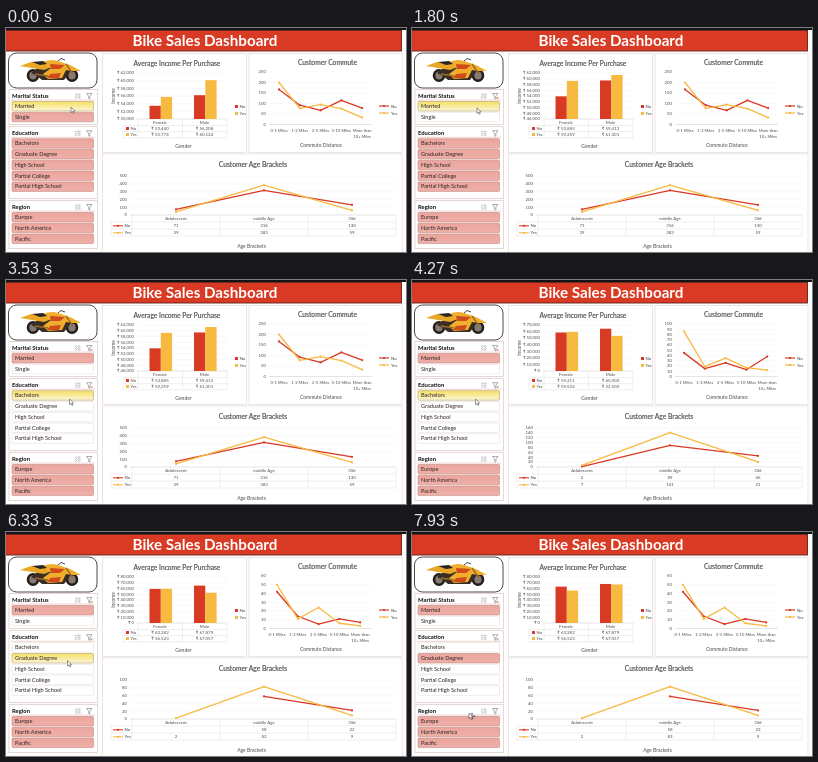
Recreate the animation shown at these times as an HTML page. Size 400 by 224 pixels, loop 8 s.

```html
<!DOCTYPE html>
<html lang="en">
<head>
<meta charset="utf-8">
<title>Bike Sales Dashboard</title>
<style>
html, body { margin: 0; width: 100%; height: 100%; overflow: hidden; background: #fff; }
svg { display: block; width: 100vw; height: 100vh; font-family: Lato, 'Noto Sans', sans-serif; }
</style>
</head>
<body>
<svg id="stage" viewBox="0 0 400 224">
  <defs>
    <linearGradient id="glow" x2="0" y2="1">
      <stop offset="0" stop-color="#f6df62"/><stop offset="1" stop-color="#fbf5d6"/>
    </linearGradient>
    <linearGradient id="pink" x2="0" y2="1">
      <stop offset="0" stop-color="#eba59d"/><stop offset="1" stop-color="#eeb0a9"/>
    </linearGradient>
  </defs>
  <g id="base"></g>
  <g id="live"></g>
  <g id="cursor"></g>
</svg>
<script>
const LOOP = 8000;
const RED = '#d93a24', GOLD = '#f7ba41', INK = '#4c4c4c', GRID = '#e2dcdc';
const el = id => document.getElementById(id);

// Drawing helpers
const text = (s, x, y, size = 4.5, anchor = 'middle', fill = INK, extra = '') =>
  `<text x="${x}" y="${y}" font-size="${size}" text-anchor="${anchor}" fill="${fill}" ${extra}>${s}</text>`;
const bold = (s, x, y, size, anchor, fill) => text(s, x, y, size, anchor, fill, 'font-weight="700"');
const heading = (s, x, y) => text(s, x, y, 6.7, 'middle', INK, `stroke="${INK}" stroke-width=".15"`);
const rect = (x, y, w, h, fill, extra = '') =>
  `<rect x="${x}" y="${y}" width="${w}" height="${h}" fill="${fill}" ${extra}/>`;
const dot = (x, y, fill) => `<circle cx="${x}" cy="${y}" r="1.1" fill="${fill}"/>`;
const path = (d, stroke, width = .5, extra = '') =>
  `<path d="${d}" fill="none" stroke="${stroke}" stroke-width="${width}" ${extra}/>`;
const hline = (x1, x2, y, color = GRID, width = .5) => path(`M${x1} ${y}H${x2}`, color, width);
const rupee = v => '₹ ' + Math.round(v).toLocaleString('en-US');
const smooth = k => { k = Math.max(0, Math.min(1, k)); return k * k * (3 - 2 * k); };

// Values are listed as No, then Yes
const incomes = [
  { max: 62000, min: 50000, step: 2000, no: [53440, 56208], yes: [55774, 60124] },
  { max: 62000, min: 46000, step: 2000, no: [53885, 59412], yes: [59259, 61301] },
  { max: 70000, min: 0, step: 10000, no: [59211, 65000], yes: [59524, 52500] },
  { max: 80000, min: 0, step: 10000, no: [63282, 67879], yes: [56523, 67057] }
];
const commutes = [
  { max: 250, step: 50, no: [167, 92, 67, 115, 78], yes: [200, 77, 95, 76, 33] },
  { max: 100, step: 10, no: [45, 15, 26, 13, 38], yes: [86, 19, 35, 17, 12] },
  { max: 60, step: 10, no: [42, 14, 5, 11, 7], yes: [50, 11, 24, 6, 3] }
];
const ages = [
  { max: 500, step: 100, no: [71, 316, 130], yes: [39, 383, 59] },
  { max: 160, step: 20, no: [2, 89, 46], yes: [7, 141, 21] },
  { max: 100, step: 20, no: [null, 58, 22], yes: [2, 83, 9] }
];

const slicers = [
  { name: 'Marital Status', y: 61.5, h: 35, items: ['Married', 'Single'], picks: [[300, 0]] },
  { name: 'Education', y: 98.7, h: 72, picks: [[3100, 0], [5900, 1]],
    items: ['Bachelors', 'Graduate Degree', 'High School', 'Partial College', 'Partial High School'] },
  { name: 'Region', y: 172.5, h: 48, items: ['Europe', 'North America', 'Pacific'], picks: [] }
];
const incomeTimes = [0, 400, 3800, 6300];
const lineTimes = [0, 3800, 6150];

// Cursor legs: start, end, x, y
const legs = [
  [0, 0, 65, 79], [1750, 2350, 63.5, 119], [4500, 5000, 64, 120.2],
  [5450, 5800, 61.5, 128.5], [7000, 7600, 57, 181]
];

const stepAt = (times, t) => times.filter(s => s <= t).length - 1;

function cursorAt(t) {
  let [, , x, y] = legs[0];
  for (const [a, b, tx, ty] of legs.slice(1)) {
    const k = smooth((t - a) / (b - a));
    x += (tx - x) * k;
    y += (ty - y) * k;
  }
  return [x, y];
}

function bike() {
  const wheel = x => `<ellipse cx="${x}" cy="47.5" rx="5" ry="5.2" fill="#857b72" stroke="#221d1a" stroke-width="2.6"/>`;
  const shape = (d, fill) => `<path d="${d}" fill="${fill}"/>`;
  return wheel(27) + wheel(66) +
    shape('M25 45L34 38L58 37L64 44L58 52L36 52L31 48Z', '#3a2d25') +
    shape('M14 38L25 34L36 34L46 39L38 42L26 40Z', '#e9a827') +
    shape('M35 35Q44 30 52 33L64 37L75 43L66 43L60 42L56 50L42 51L37 46L45 40Z', '#efae2c') +
    shape('M44 36L59 37L54 41L45 41ZM44 46L55 45L53 50L41 50Z', '#cf4a1d') +
    shape('M26 34L37 33L41 36L34 37Z', '#2a2422') +
    path('M60 36L67 46M29 46L42 48', '#9b6a25', 1.4) +
    path('M52 33L55 30.5L59 32', '#333', .9);
}

function drawBase() {
  const panel = (x, y, w, h) => rect(x, y, w, h, '#fff', `stroke="${GRID}" stroke-width=".7"`);
  let s = rect(0, 0, 400, 224, '#fffcfc') + rect(0, 0, 400, 2, '#151313') +
    rect(-1, 2.5, 396.5, 20.5, RED, 'stroke="#5e211a" stroke-width=".9"') +
    bold('Bike Sales Dashboard', 199, 18, 15.2, 'middle', '#fff') +
    rect(2.5, 25, 88.5, 35, '#fff', 'rx="8" stroke="#3d3535" stroke-width=".9"') + bike();
  s += panel(96.5, 25.5, 144, 99) + panel(243, 25.5, 153, 99) + panel(96.5, 126, 299.5, 101);
  s += heading('Average Income Per Purchase', 171, 37.9) + heading('Customer Commute', 321.5, 36.8) +
    heading('Customer Age Brackets', 247, 139.3);
  s += text('Gender', 177.5, 120, 5) + text('Commute Distance', 315, 118.7, 5) + text('Age Brackets', 245.5, 219.8, 5) +
    text('Income', 0, 0, 4.8, 'middle', INK, 'transform="translate(109 68) rotate(-90)"');
  [['No', RED], ['Yes', GOLD]].forEach(([name, color], i) => {
    const y = 78.5 + i * 7;
    s += rect(229, y - 1.5, 3, 3, color) + text(name, 233.5, y + 1.5, 4.4, 'start');
    s += hline(373, 383, y - .5, color, 1.2) + dot(378, y - .5, color) + text(name, 385, y + 1, 4.4, 'start');
    s += rect(120, 99 + i * 6, 3, 3, color) + text(name, 124.5, 102.1 + i * 6, 4.2, 'start');
    s += hline(107, 117, 197.8 + i * 7, color, 1.1) + dot(112, 197.8 + i * 7, color) +
      text(name, 118.5, 199.4 + i * 7, 4.4, 'start');
  });
  // Data table rules
  s += path('M132 91V109.8M176.5 91V109.8M221 91V109.8M117 97.5V109.8M117 97.5H221M117 103.7H221M117 109.8H221', GRID);
  s += path('M126 187V208M214 187V208M302 187V208M390 187V208M105 194V208M105 194H390M105 201H390M105 208H390', GRID);
  s += text('Female', 154, 95.8, 4.4) + text('Male', 198.5, 95.8, 4.4);
  ['Adolescent', 'middle Age', 'Old'].forEach((n, i) => s += text(n, 170 + i * 88, 192, 4.4));
  el('base').innerHTML = s;
}

function axis({ max, min = 0, step }, top, bottom, right, x2, label) {
  let s = '';
  for (let v = min; v <= max; v += step) {
    const y = bottom - (v - min) / (max - min) * (bottom - top);
    s += hline(right + 3, x2, y, v === min ? '#cfc8c8' : '#f5f1f1') + text(label(v), right, y + 1.3, 4.3, 'end');
  }
  return s;
}

function incomeChart(t) {
  const n = stepAt(incomeTimes, t), now = incomes[n], was = incomes[Math.max(0, n - 1)];
  const k = smooth((t - incomeTimes[n]) / 600);
  let s = axis(now, 45, 91, 128, 221, rupee);
  ['no', 'yes'].forEach((key, j) => now[key].forEach((v, i) => {
    const shown = Math.max(now.min, was[key][i] + (v - was[key][i]) * k);
    const h = (shown - now.min) / (now.max - now.min) * 46;
    s += rect(143.5 + i * 44.5 + j * 11.3, 91 - h, 11.3, h, j ? GOLD : RED) +
      text(rupee(v), 154 + i * 44.5, 102.1 + j * 6, 4.4);
  }));
  return s;
}

function plot(data, x0, dx, bottom, height) {
  const line = (vals, color) => {
    const pts = vals.map((v, i) => [x0 + i * dx, bottom - v / data.max * height]).filter((p, i) => vals[i] !== null);
    return path('M' + pts.map(p => p.join(' ')).join('L'), color, 1.3, 'stroke-linejoin="round" stroke-linecap="round"') +
      pts.map(([x, y]) => dot(x, y, color)).join('');
  };
  return line(data.no, RED) + line(data.yes, GOLD);
}

function lineCharts(t) {
  const n = stepAt(lineTimes, t), ride = commutes[n], age = ages[n];
  const x0 = 273 - n, bottom = 96.5, same = v => v;
  let s = axis(ride, 44, bottom, 260, 366, same) + plot(ride, x0, 20.8, bottom, bottom - 44);
  ['0-1 Miles', '1-2 Miles', '2-5 Miles', '5-10 Miles', 'More than'].forEach((name, i) =>
    s += text(name, x0 + i * 20.8, 104.4, 4.1));
  s += text('10+ Miles', x0 + 83.2, 109.9, 4.1);
  s += axis(age, 148, 187, 121, 390, same) + plot(age, 170, 88, 187, 39);
  ['no', 'yes'].forEach((key, j) => age[key].forEach((v, i) =>
    s += text(v ?? '', 170 + i * 88, 199.4 + j * 7, 4.4)));
  return s;
}

function slicer({ name, y, h, items, picks }, t, [cx, cy]) {
  const pick = picks.filter(p => p[0] <= t).pop();
  let s = rect(3, y, 88.5, h, '#fff', 'stroke="#d9c8c6" stroke-width=".7"') +
    bold(name, 6, y + 8.1, 5.9, 'start', '#111') + hline(5, 89, y + 10.6, '#dfa39c');
  for (let i = 0; i < 3; i++) s += path(`M69 ${y + 4.5 + i * 1.9}l.7 .6l1 -1.2M71.5 ${y + 4.6 + i * 1.9}h3`, '#777');
  s += path(`M80.5 ${y + 4}h5.5l-2.1 2.6v3l-1.3 -.8v-2.2z`, '#777', .6);
  if (pick) s += path(`M84.6 ${y + 7.5}l2 2m0 -2l-2 2`, '#b9665c', .6);
  items.forEach((label, i) => {
    const top = y + 12 + i * 10.8;
    const hover = cx > 6 && cx < 88 && cy >= top && cy < top + 10.2;
    const on = !pick || pick[1] === i;
    const [fill, edge] = hover ? ['url(#glow)', '#b5a571'] : on ? ['url(#pink)', '#c58a83'] : ['#fff', '#e8dedd'];
    s += rect(6, top, 81.5, 9.5, fill, `rx="1" stroke="${edge}" stroke-width=".6"`) +
      text(label, 9, top + 6.5, 5.6, 'start', '#2a2222');
  });
  return s;
}

function drawCursor([x, y]) {
  const move = y > 173 ? path('M0 3.2H6M3 .2V6.2M1 2.2L0 3.2L1 4.2M5 2.2L6 3.2L5 4.2M2 1.2L3 .2L4 1.2M2 5.2L3 6.2L4 5.2', '#333', .6) : '';
  return `<g transform="translate(${x} ${y})">${move}` +
    '<path d="M0 0V5.6L1.4 4.4L2.4 6.5L3.3 6.1L2.4 4.1H4.1Z" fill="#fff" stroke="#333" stroke-width=".5"/></g>';
}

let last = '';
function draw(t) {
  const at = cursorAt(t);
  const s = slicers.map(g => slicer(g, t, at)).join('') + incomeChart(t) + lineCharts(t);
  if (s !== last) el('live').innerHTML = last = s;
  el('cursor').innerHTML = drawCursor(at);
}

const start = performance.now();
function tick() {
  draw((performance.now() - start) % LOOP);
  requestAnimationFrame(tick);
}
drawBase();
tick();
</script>
</body>
</html>
```
